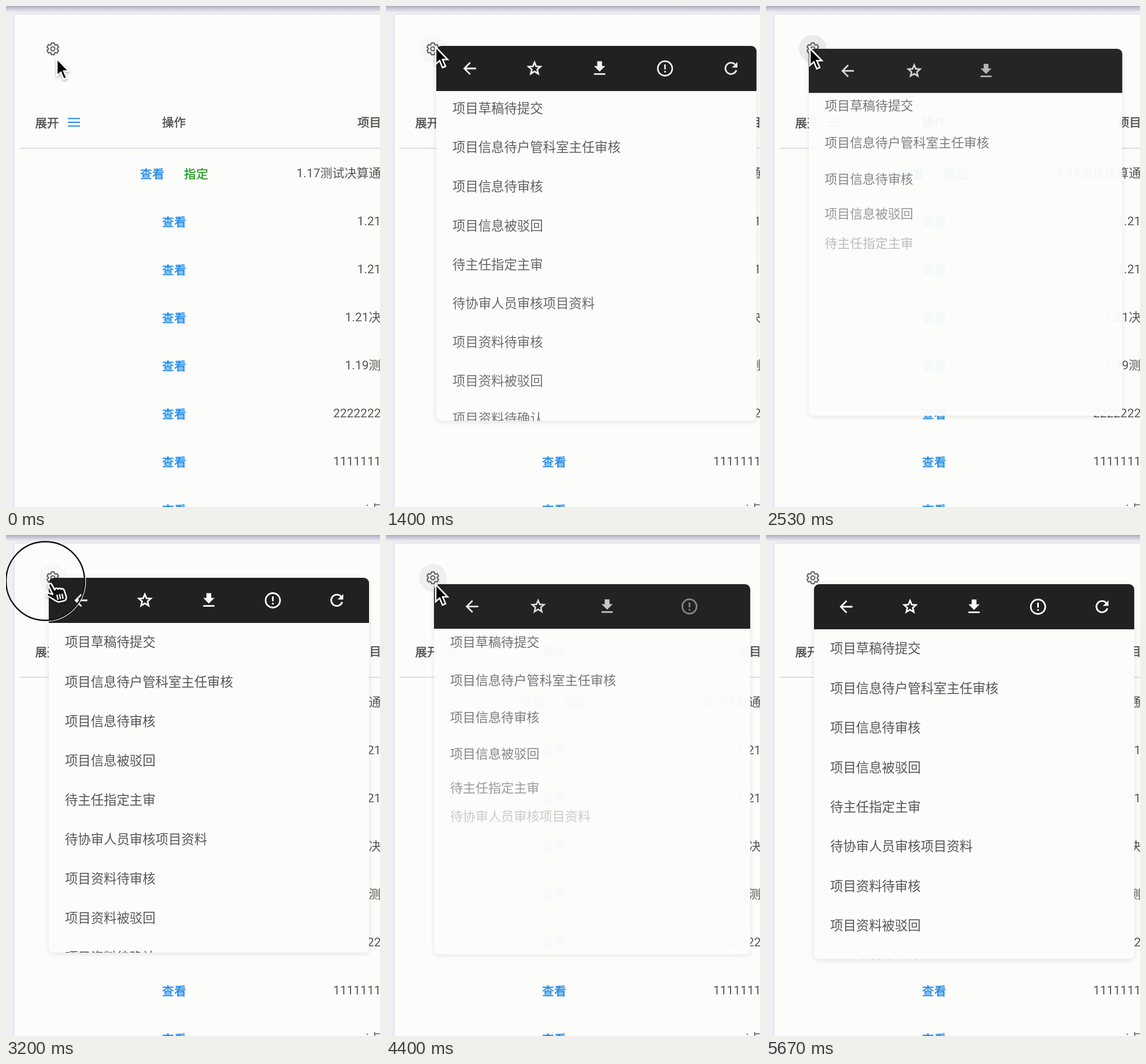
These frames come from a looping animation (647x866 px, 5.74 s). An HTML page:

```html
<!DOCTYPE html>
<html lang="zh-CN">
<head>
<meta charset="utf-8">
<title>菜单动画</title>
<style>
  html, body { margin: 0; width: 100%; height: 100%; overflow: hidden; background: #eeeef3; }
  svg { display: block; }
  text { font: 400 21px Roboto, "Noto Sans CJK SC", "Noto Sans CJK", sans-serif; fill: #555; }
  .head, .link { font-size: 20.5px; font-weight: 500; stroke-width: .5; }
  .head { fill: #505050; stroke: #505050; }
  .link { fill: #1e88e5; stroke: #1e88e5; letter-spacing: .8px; }
  .go { fill: #2ca02c; stroke: #2ca02c; }
  .name { text-anchor: end; }
  .item { font-size: 22.4px; }
  .line { fill: none; stroke: #fff; stroke-width: 2; }
  #card { filter: drop-shadow(0 0 2px rgba(60, 60, 90, .12)); }
  #panel { filter: drop-shadow(0 2px 5px rgba(0, 0, 0, .1)); }
  #cursor { filter: drop-shadow(0 2px 2px rgba(0, 0, 0, .3)); }
</style>
</head>
<body>
<svg width="647" height="866" viewBox="0 0 647 866">
  <defs>
    <linearGradient id="edge" x2="0" y2="1">
      <stop offset="0" stop-color="#aaa9bd"/>
      <stop offset=".4" stop-color="#c9c9d6"/>
      <stop offset="1" stop-color="#eeeef3"/>
    </linearGradient>
    <clipPath id="body"><rect y="78" width="554" height="570"/></clipPath>
    <clipPath id="bar"><rect width="554" height="78"/></clipPath>
  </defs>
  <rect width="647" height="866" fill="#eeeef3"/>
  <rect width="647" height="11" fill="url(#edge)"/>
  <rect id="card" x="15" y="15" width="660" height="880" rx="4" fill="#fcfcfb"/>
  <circle id="ripple" cx="81" cy="74" r="24"/>
  <g id="gear" transform="translate(81 74)" fill="none" stroke="#666" stroke-width="2.2" stroke-linejoin="round"></g>
  <g id="table">
    <path d="M107 194.5h21M107 201h21M107 207.5h21" stroke="#1e88e5" stroke-width="2"/>
    <path d="M23 246h624" stroke="#d3d3e2" stroke-width="1.6"/>
  </g>
  <g id="menu">
    <rect id="panel" width="554" height="648" rx="9" fill="#fcfcfb"/>
    <path id="top" d="M0 78V9a9 9 0 0 1 9-9h536a9 9 0 0 1 9 9v69z" fill="#212121"/>
    <g id="icons" clip-path="url(#bar)"></g>
    <g id="items" clip-path="url(#body)"></g>
  </g>
  <g id="ring" fill="none">
    <circle cx="68" cy="79.5" r="69.6" stroke="#fff" stroke-width="1.4"/>
    <circle cx="68" cy="79.5" r="68" stroke="#111" stroke-width="2.4"/>
  </g>
  <g id="cursor">
    <path id="arrow" transform="scale(1.06)" d="M0 0V28l6.4-5.8 4.7 11.3 5-2.1-4.8-11.1H19.5z" fill="#000" stroke="#fff" stroke-width="2.4"/>
    <g id="hand" transform="rotate(-12)" stroke="#fff" stroke-linejoin="round">
      <path d="M0 3C0-1 5-2 6 2l3 10c1-3 5-3 6 0 2-2 5-1 5 1 3-1 5 1 5 4l1 10c0 4-2 7-6 7H12C8 34 1 24-5 20c-3-3 0-6 4-4l5 3z" fill="#111" stroke-width="2.6"/>
      <path d="M11 21v9M15.5 21v9M20 21v9" stroke-width="2.4"/>
    </g>
  </g>
</svg>
<script>
const LOOP = 5740, STEP = LOOP / 86, STAGGER = 40, CLOSE = 195, MOVE = 450;
const $ = id => document.getElementById(id);
const show = (id, on) => { $(id).style.display = on ? '' : 'none'; };

function add(parent, tag, attrs, text = '') {
  const el = document.createElementNS('http://www.w3.org/2000/svg', tag);
  for (const k in attrs) el.setAttribute(k, attrs[k]);
  el.textContent = text;
  return parent.appendChild(el);
}
const label = (parent, x, mid, text, cls) =>
  add(parent, 'text', { x, y: mid + 8, class: cls }, text);

// Page
const teeth = [];
for (let k = 0; k < 24; k++) {
  const tip = k % 4 < 2;
  const deg = Math.floor(k / 4) * 60 - 90 + (tip ? 13 : 30) + (k % 2 ? 1 : -1) * (tip ? 13 : 3) - (tip ? 13 : 0);
  const a = deg * Math.PI / 180, r = tip ? 10.4 : 7.6;
  teeth.push(`${r * Math.cos(a)},${r * Math.sin(a)}`);
}
add($('gear'), 'polygon', { points: teeth.join(' ') });
add($('gear'), 'circle', { r: 3.5 });

const table = $('table');
label(table, 50.5, 202, '展开', 'head');
label(table, 270, 200.5, '操作', 'head');
label(table, 608, 200.5, '项目', 'head');
['1.17测试决算通', '1.21', '1.21', '1.21决', '1.19测', '2222222', '1111111', 'i点'].forEach((name, i) => {
  const y = 288 + 83 * i;
  label(table, 648.5, y, name, 'name');
  label(table, i ? 270 : 232, y + 2, '查看', 'link');
});
label(table, 308, 290, '指定', 'link go');

// Menu
const icons = [
  '<path class="line" d="M20 12H5.5M12.7 4.7 5.4 12l7.3 7.3"/>',
  '<path class="line" d="M12 4.5l2.1 4.9 5.3.4-4 3.5 1.2 5.2-4.6-2.8-4.6 2.8 1.2-5.2-4-3.5 5.3-.4z"/>',
  '<path fill="#fff" d="M19 9h-4V3H9v6H5l7 7zM5 18v2h14v-2z"/>',
  '<circle class="line" cx="12" cy="12" r="9"/><path class="line" d="M12 7v6m0 2v2"/>',
  '<path class="line" d="M18.7 14a7 7 0 1 1-1.7-7"/><path fill="#fff" d="M20 4v7h-7z"/>'
].map(shape => {
  const g = add($('icons'), 'g', {});
  g.innerHTML = `<g transform="scale(1.39) translate(-12 -12)">${shape}</g>`;
  return g;
});
const items = ['项目草稿待提交', '项目信息待户管科室主任审核', '项目信息待审核', '项目信息被驳回',
  '待主任指定主审', '待协审人员审核项目资料', '项目资料待审核', '项目资料被驳回', '项目资料待确认']
  .map((name, i) => label($('items'), 28, 111.3 + 68.4 * i, name, 'item'));

// Timeline
const opens = [
  { at: 937, end: 1730, x: 87, y: 69 },
  { at: 2350, end: 3205, x: 74, y: 74 },
  { at: 4188, end: LOOP, x: 83, y: 85 }
];
const stops = [
  { at: 0, x: 88, y: 91 },
  { at: 937, x: 87.5, y: 69 },
  { at: 1730, x: 79, y: 80 },
  { at: 2350, x: 76, y: 73 },
  { at: 3150, x: 73, y: 85 },
  { at: 4188, x: 86, y: 85.5 },
  { at: 5300, x: 150, y: 890 }
];

// The pointer rests, then glides to the next stop just before it is due
function pointer(t) {
  const next = stops.findIndex(s => s.at > t);
  if (next < 0) return stops[stops.length - 1];
  const a = stops[next - 1], b = stops[next];
  const p = Math.max(0, 1 - (b.at - t) / MOVE), e = p * p * (3 - 2 * p);
  return { x: a.x + (b.x - a.x) * e, y: a.y + (b.y - a.y) * e };
}

// Remaining part of a staggered slide: fast start, long tail
const rest = s => s <= 0 ? 1 : s >= 20 ? 0 : (1 - (s / 20) ** 2) / (1 + s);

function drawMenu(t) {
  const m = opens.find(o => t >= o.at && t < o.end + CLOSE);
  show('menu', m);
  if (!m) return;
  const beat = (t - m.at) / STAGGER;
  const out = Math.max(0, (t - m.end) / CLOSE);
  const shown = (1 - Math.exp(-.68 * beat)) * (1 - out);
  $('menu').setAttribute('transform', `translate(${m.x} ${m.y}) scale(${.5 + shown / 2})`);
  $('panel').style.opacity = shown;
  $('top').style.opacity = Math.sqrt(shown);
  icons.forEach((el, i) => {
    const r = rest(1.4 * beat - 2.25 * i);
    el.setAttribute('transform', `translate(${55.5 + 110.7 * i + 111 * r - 68 * out} 39)`);
    el.style.opacity = (1 - r) * (1 - out) * Math.sqrt(shown);
  });
  items.forEach((el, i) => {
    const r = rest(beat - i);
    el.setAttribute('transform', `translate(0 ${-68 * r - 62 * out})`);
    el.style.opacity = (1 - r) * (1 - out) * shown;
  });
}

// Each click on the gear flashes its round backdrop
function glow(t) {
  const clicks = opens.flatMap(o => [o.at, o.end]).filter(c => c <= t);
  const dt = t - clicks[clicks.length - 1];
  return clicks.length && t < 4600 ? .02 + .2 * Math.exp(-((dt / 160) ** 2)) : 0;
}

function draw(t) {
  drawMenu(t);
  $('ripple').style.opacity = glow(t);
  show('ring', t > 3140 && t < 3260);
  const hand = t > 500 && t < 937 || t >= 1730 && t < 2350 || t >= 3150 && t < 4188;
  show('hand', hand);
  show('arrow', !hand);
  const { x, y } = pointer(t);
  $('cursor').setAttribute('transform', `translate(${x} ${y})`);
}

const start = performance.now();
function tick() {
  const t = (performance.now() - start) % LOOP;
  draw(Math.floor(t / STEP + .1) * STEP % LOOP);
  requestAnimationFrame(tick);
}
tick();
</script>
</body>
</html>
```
